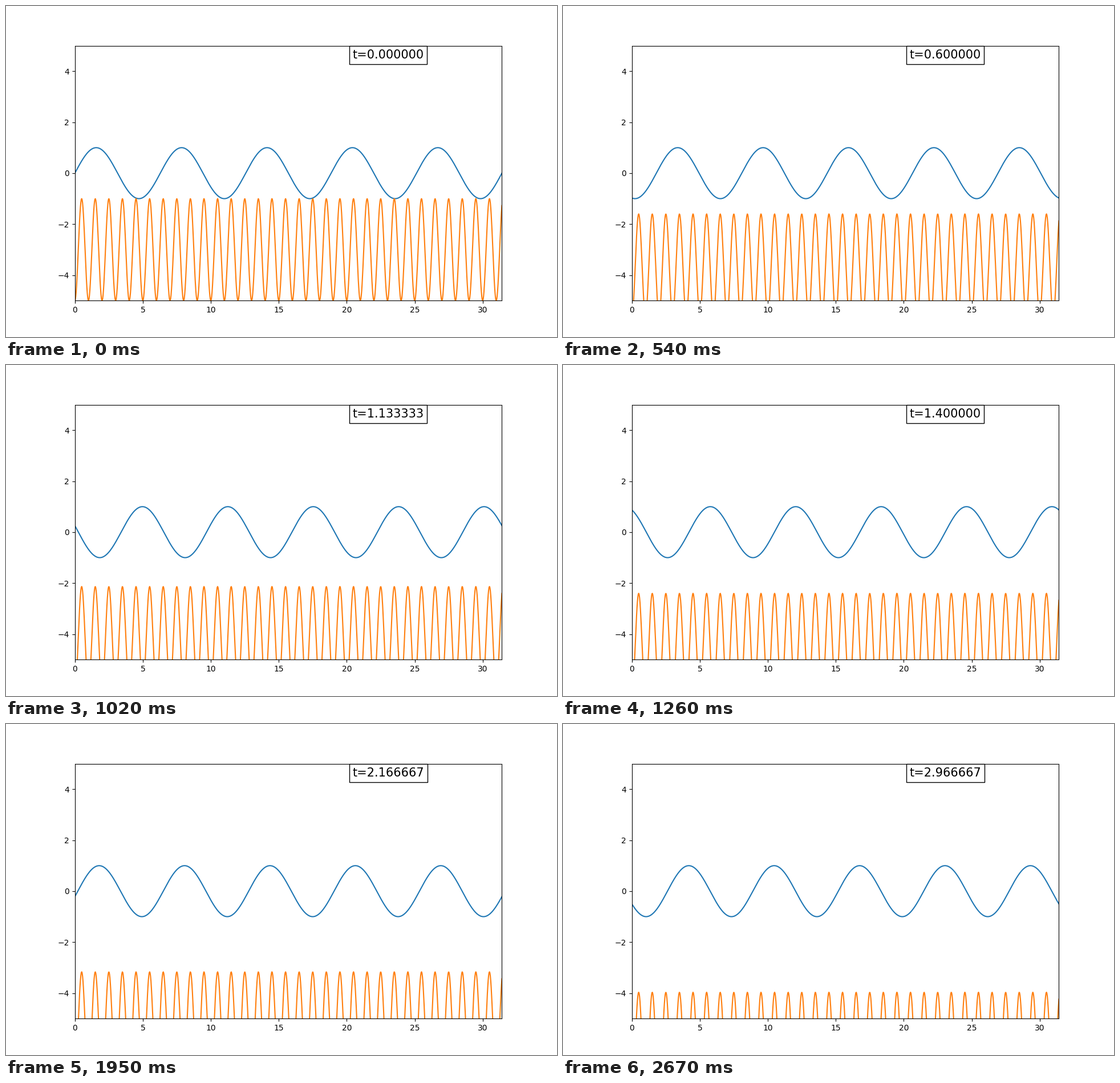
Recreate the animation shown at these times as a matplotlib script. Size 966 px wide and 580 px high, loop 2.7 s.

```python
import matplotlib.pyplot as plt
import numpy as np
from matplotlib.animation import FuncAnimation

FRAMES = 90
INTERVAL = 30
DURATION = 3.0

fig, ax = plt.subplots(figsize=(9.66, 5.8), dpi=100)
x = np.linspace(0, 10 * np.pi, 1000)
ax.set_xlim(0, 10 * np.pi)
ax.set_ylim(-5, 5)

wave, = ax.plot([], [], color="tab:blue")
comb, = ax.plot([], [], color="tab:orange")
clock = ax.text(0.65, 0.95, "", transform=ax.transAxes, fontsize=15,
                bbox=dict(facecolor="white", edgecolor="black"))


def draw(frame):
    t = DURATION * frame / FRAMES
    wave.set_data(x, np.sin(x - 3 * t))
    comb.set_data(x, -3 - t - 2 * np.cos(2 * np.pi * x))
    clock.set_text(f"t={t:.6f}")
    return wave, comb, clock


anim = FuncAnimation(fig, draw, frames=FRAMES, interval=INTERVAL,
                     repeat=True, repeat_delay=0)
plt.show()
```
